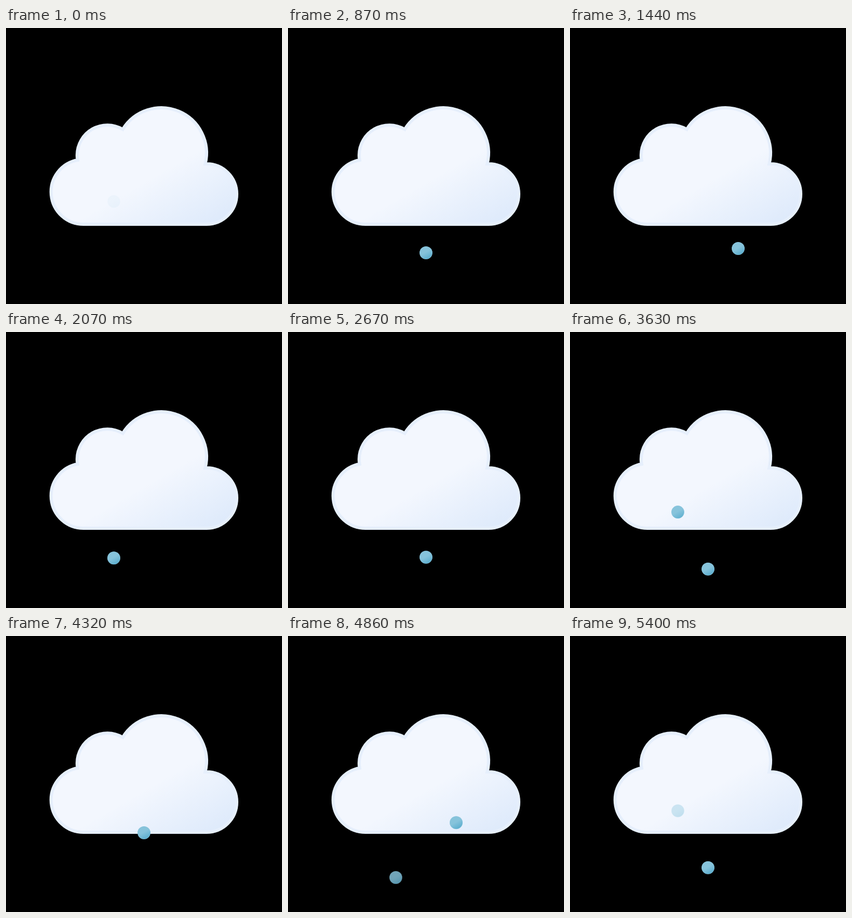
Recreate the animation shown at these times as an HTML page with a canvas. Size 512 px wide and 512 px high, loop 5.43 s.

```html
<!DOCTYPE html>
<html lang="en">
<head>
<meta charset="utf-8">
<title>Cloud with hail</title>
<style>
  html, body { margin: 0; width: 100%; height: 100%; overflow: hidden; background: #000; }
  canvas { display: block; width: 512px; height: 512px; }
</style>
</head>
<body>
<canvas id="stage" width="512" height="512"></canvas>
<script>
const ctx = document.getElementById('stage').getContext('2d');

const LOOP = 5430;      // ms
const STEP = 30;        // ms each picture stays
const RATE = 30;        // pictures per second of motion time
const PERIOD = 0.9987;  // s between two falls of one stone
const SPEED = 322.5;    // px per s
const TOP = 321.2, GROUND = 448;
const FADE_IN = 0.045, FADE_AT = 0.39, FADE_OUT = 0.045;

const stones = [
  { x: 200, begin: -0.0015 },
  { x: 312, begin: 0.329 },
  { x: 256, begin: 0.6697 }
];

const cloud = new Path2D('m291 107-2.5.1A83.9 83.9 0 0 0 135.6 43 56 56 0 0 0 51 91' +
  'a56.6 56.6 0 0 0 .8 9A60 60 0 0 0 63 219l4-.2v.2h224a56 56 0 0 0 0-112Z');

function gradient(x1, y1, x2, y2, mid, from, to) {
  const g = ctx.createLinearGradient(x1, y1, x2, y2);
  g.addColorStop(0, from);
  g.addColorStop(mid, from);
  g.addColorStop(1, to);
  return g;
}

const cloudFill = gradient(99.5, 30.7, 232.6, 261.4, 0.5, '#f3f7fe', '#deeafb');
const stoneFill = gradient(-5.5, -9.9, 5.5, 9.9, 0.45, '#86c3db', '#5eafcf');

const clamp = v => Math.max(0, Math.min(1, v));

function drawCloud() {
  ctx.save();
  ctx.translate(81, 145);
  ctx.fillStyle = cloudFill;
  ctx.strokeStyle = '#e6effc';
  ctx.lineWidth = 6;
  ctx.fill(cloud);
  ctx.stroke(cloud);
  ctx.restore();
}

function drawStone({ x, begin }, s) {
  if (s < begin) return;
  const age = (s - begin) % PERIOD;
  const alpha = Math.min(clamp(age / FADE_IN), clamp(1 - (age - FADE_AT) / FADE_OUT));
  if (alpha <= 0) return;
  ctx.save();
  ctx.translate(x, Math.min(GROUND, TOP + SPEED * age));
  ctx.globalAlpha = alpha;
  ctx.beginPath();
  ctx.arc(0, 0, 12, 0, Math.PI * 2);
  ctx.fillStyle = '#86c3db';
  ctx.fill();
  ctx.beginPath();
  ctx.arc(0, 0, 11.5, 0, Math.PI * 2);
  ctx.fillStyle = stoneFill;
  ctx.fill();
  ctx.restore();
}

function draw(ms) {
  const s = Math.floor((ms % LOOP) / STEP) / RATE;
  ctx.fillStyle = '#000';
  ctx.fillRect(0, 0, 512, 512);
  drawCloud();
  stones.forEach(stone => drawStone(stone, s));
}

const start = performance.now();
function tick() {
  draw(performance.now() - start);
  requestAnimationFrame(tick);
}
tick();
</script>
</body>
</html>
```
